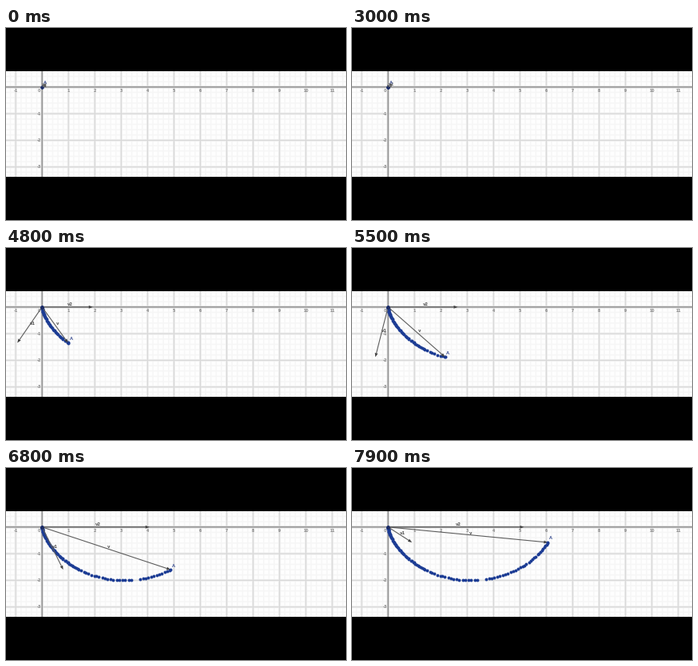
These frames come from a looping animation (426x240 px, 8 s). A matplotlib script:

```python
import numpy as np
import matplotlib.pyplot as plt
from matplotlib.animation import FuncAnimation
from matplotlib.patches import Polygon, Rectangle

W, H, DPI = 426, 240, 64
FRAMES, STEP = 80, 100
OX, OY = 45.2, 73.8          # origin of the coordinate system, in pixels
SX, SY = 33.05, 33.3         # pixels per unit
TOP, BOTTOM = 54, 186

BLUE = "#1c3c94"
INK = "#5c5c5c"

KEY_MS = [2950, 3800, 4100, 4700, 5500, 6200, 6500, 6800, 7400, 7900]
KEY_ANGLE = [0, 0.93, 1.235, 1.82, 2.64, 3.42, 3.75, 4.07, 4.68, 5.15]


def px(n):
    return n * 72 / DPI


def to_px(x, y):
    return OX + SX * x, OY - SY * y


def cycloid(a):
    return to_px(a - np.sin(a), np.cos(a) - 1)


fig = plt.figure(figsize=(W / DPI, H / DPI), dpi=DPI, facecolor="black")
ax = fig.add_axes([0, 0, 1, 1])
ax.set_xlim(0, W)
ax.set_ylim(H, 0)
ax.axis("off")
ax.add_patch(Rectangle((0, TOP), W, BOTTOM - TOP, fc="#fefefe", lw=0,
                       zorder=0))


def rule(xs, ys, color, width, z):
    ax.plot(xs, ys, color=color, lw=px(width), zorder=z, snap=False,
            solid_capstyle="butt")


def vertical(x, *style):
    rule([x, x], [TOP, BOTTOM], *style)


def horizontal(y, *style):
    rule([0, W], [y, y], *style)


def label(x, y, text, size, color, z=8):
    return ax.text(x, y, text, fontsize=px(size), color=color, zorder=z,
                   ha="center", va="center", family="DejaVu Sans",
                   weight="bold")


# each line is a thin core over a pale, wider halo
MINOR = [("#f6f6f6", 1.5, 1)]
MAJOR = [("#efefef", 3, 2), ("#d9d9d9", 1.2, 2.5)]
AXIS = [("#dadada", 3, 3), ("#8c8c8c", 1.3, 3.5)]


def grid(draw_line, start, step, first, last):
    for i in range(first, last):
        for style in MAJOR if i % 5 == 0 else MINOR:
            draw_line(start + step * i / 5, *style)
    for style in AXIS:
        draw_line(start, *style)


grid(vertical, OX, SX, -6, 58)
grid(horizontal, OY, SY, -2, 17)

for n in range(-1, 12):
    shift = -4 if n == 0 else 0
    label(OX + SX * n + shift, OY + 4.6, str(n), 4.8, "#8a8a8a", 4)
for n in range(1, 4):
    label(OX - 4.2, OY + SY * n, str(-n), 4.8, "#8a8a8a", 4)

# trace dots get sparser, with one dropped stretch past the lowest point
rng = np.random.default_rng(4)
angles = np.concatenate([np.arange(0, 2.2, 0.035), np.arange(2.2, 5.2, 0.056)])
angles = angles + rng.uniform(-0.014, 0.014, angles.size)
angles = angles[(angles < 3.28) | (angles > 3.41)]
angles[0] = 0


class Arrow:
    def __init__(self, name, lift):
        self.offset = np.array([3.3, -lift])
        self.line, = ax.plot([], [], color=INK, lw=px(1.1), zorder=6,
                             snap=False, solid_capstyle="butt")
        self.head = Polygon(np.zeros((3, 2)), fc="#404040", lw=0, zorder=6)
        ax.add_patch(self.head)
        self.text = label(0, 0, name, 5.2, "#555555")

    def point(self, tip):
        start, tip = np.array([OX, OY]), np.array(tip)
        delta = tip - start
        length = np.hypot(*delta)
        unit = delta / length if length > 0 else np.zeros(2)
        back = tip - unit * min(5, length)
        side = np.array([-unit[1], unit[0]]) * min(1.9, length)
        self.line.set_data([start[0], back[0]], [start[1], back[1]])
        self.head.set_xy([tip, back + side, back - side])
        self.text.set_position((start + tip) / 2 + self.offset)


trace, = ax.plot([], [], "o", ms=px(3.9), mfc=BLUE, mec="none", zorder=5,
                 snap=False)
pen, = ax.plot([], [], "o", ms=px(4), mfc=BLUE, mec="none", zorder=7,
               snap=False)
origin, = ax.plot([OX], [OY], "o", ms=px(4), mfc="#1b2a62", mec="none",
                  zorder=7, snap=False)
slide, spoke, total = Arrow("v2", 3.6), Arrow("v1", 1.5), Arrow("v", 2)
pen_name = label(0, 0, "A", 5.2, "#5566a0")


def draw(frame):
    ms = frame * STEP
    a = np.interp(ms, KEY_MS, KEY_ANGLE)
    x, y = cycloid(a)
    trace.set_data(*cycloid(angles[angles <= a]))
    pen.set_data([x], [y])
    origin.set_markersize(px(4 if ms < 800 else 4.5))
    slide.point(to_px(a, 0))
    spoke.point(to_px(-np.sin(a), np.cos(a) - 1))
    total.point((x, y))
    pen_name.set_position((x + 3.9, y - 5))
    return []


anim = FuncAnimation(fig, draw, frames=FRAMES, interval=STEP,
                     init_func=lambda: draw(0), repeat=True, repeat_delay=0,
                     blit=False)
plt.show()
```
